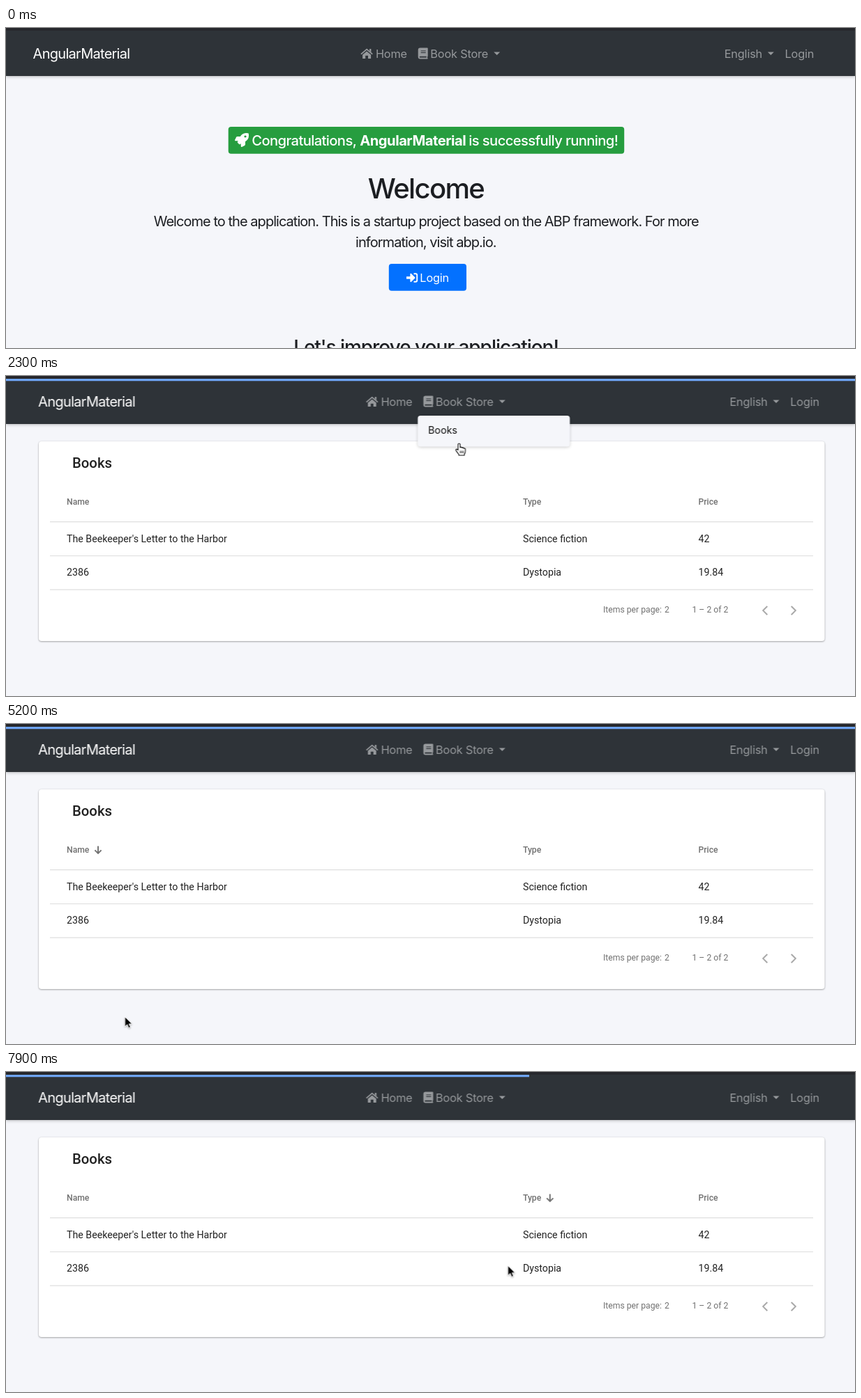
An HTML page that plays this animation: 1217x460 px, repeating every 8 s.

```html
<!DOCTYPE html>
<html lang="en">
<head>
<meta charset="utf-8">
<title>AngularMaterial</title>
<style>
html, body { margin: 0; width: 100%; height: 100%; overflow: hidden; background: #f5f6fa; }
svg { display: block; width: 1217px; height: 460px; }
text { font-family: Inter, sans-serif; font-optical-sizing: none; fill: #1c1e22; white-space: pre; }
.mid { text-anchor: middle; }

/* navigation */
.link { font-size: 16.3px; letter-spacing: -.01em; text-anchor: middle; fill: inherit; }
.muted { fill: #96999c; }
.brand { font-size: 20px; letter-spacing: -.036em; fill: #fff; }
.item { font-size: 14.2px; fill: #111; }
.drop { filter: drop-shadow(0 1px 2px rgba(0,0,0,.2)); }

/* welcome page */
.badge text { font-size: 20.2px; font-weight: 500; letter-spacing: -.03em; text-anchor: middle; fill: #fff; }
.badge .strong { font-weight: 700; letter-spacing: -.024em; }
.h1 { font-size: 40px; font-weight: 500; letter-spacing: -.041em; }
.h3 { font-size: 28px; font-weight: 500; letter-spacing: -.037em; }
.lead { font-size: 20px; letter-spacing: -.048em; }

/* books page */
.books text { font: 400 14.2px Roboto, sans-serif; fill: rgba(0,0,0,.87); }
.books .title { font-size: 20.3px; font-weight: 500; }
.books .head { font-size: 12.2px; font-weight: 500; fill: rgba(0,0,0,.56); }
.books .page { font-size: 12.2px; fill: rgba(0,0,0,.56); }
.card { filter: drop-shadow(0 1px 1px rgba(0,0,0,.3)) drop-shadow(0 0 1px rgba(0,0,0,.1)); }
.rule { stroke: rgba(0,0,0,.13); stroke-width: 1.2; }
.sort { fill: none; stroke: #717171; stroke-width: 1.9; }
.chev { fill: none; stroke: #a9a9a9; stroke-width: 2; }

/* timeline: 1.25% is one 100 ms step */
.a { animation: 8s step-end -8ms infinite; }
.nav { animation-name: nav; }
.home { animation-name: home; }
.books { animation-name: books; }
.menu { animation-name: menu; }
.hover { animation-name: hover; }
.store { animation-name: store; }
.bar { animation-name: bar; }
.row { animation-name: swap; }
.name-up { animation-name: name-up; }
.name-down { animation-name: name-down; }
.type-up { animation-name: type-up; }
.type-down { animation-name: type-down; }
.cursor { animation-name: move; }
.arrow { animation-name: arrow; }
.hand { animation-name: hand; }
.ring { animation-name: ring; }

@keyframes nav { 0% { transform: translateX(-7.6px); } 23.75%, to { transform: none; } }
@keyframes home { 0% { opacity: 1; } 23.75%, to { opacity: 0; } }
@keyframes books { 0% { opacity: 0; } 23.75%, to { opacity: 1; } }
@keyframes menu { 0%, 31.25%, to { opacity: 0; } 13.75% { opacity: 1; } }
@keyframes hover { 0%, to { fill: #fff; } 20% { fill: #f5f6fa; } }
@keyframes store { 0%, 20%, to { fill: #96999c; } 13.75% { fill: #c8cacb; } }
@keyframes bar {
  0%, 31.25%, 56.25%, 68.75%, 90%, to { transform: scaleX(0); opacity: 0; }
  23.75%, 50%, 62.5%, 83.75%, 98.75% { transform: scaleX(.6163); opacity: 1; }
  25%, 51.25%, 63.75%, 85% { transform: scaleX(.85); opacity: 1; }
  26.25%, 52.5%, 65%, 86.25% { transform: none; opacity: 1; }
  30%, 55%, 67.5%, 88.75% { transform: none; opacity: .8; }
}
@keyframes swap {
  0%, 61.25%, 97.5%, to { transform: none; }
  48.75%, 82.5% { transform: translateY(var(--shift)); }
}
@keyframes name-up { 0%, 56.25%, to { opacity: 0; } 42.5% { opacity: 1; } }
@keyframes name-down { 0%, 78.75%, to { opacity: 0; } 56.25% { opacity: 1; } }
@keyframes type-up { 0%, 92.5%, to { opacity: 0; } 78.75% { opacity: 1; } }
@keyframes type-down { 0% { opacity: 0; } 92.5%, to { opacity: 1; } }
@keyframes arrow {
  0%, 13.75%, 40%, 75% { opacity: 0; }
  1.25%, 30%, 60%, 95%, to { opacity: 1; }
}
@keyframes hand {
  0%, 30%, 60%, 95%, to { opacity: 0; }
  13.75%, 40%, 75% { opacity: 1; }
}
@keyframes ring {
  0%, 23.75%, 45%, 57.5%, 80%, 93.75%, to { opacity: 0; }
  21.25%, 42.5%, 55%, 77.5%, 91.25% { opacity: 1; }
}
@keyframes move {
  0% { transform: translate(579px, 142px); }
  1.25% { transform: translate(579px, 142px); animation-timing-function: steps(3); }
  5% { transform: translate(750px, 346px); }
  6.25% { transform: translate(750px, 346px); animation-timing-function: steps(2); }
  8.75% { transform: translate(852px, 215px); animation-timing-function: steps(2); }
  11.25% { transform: translate(700px, 5px); }
  12.5% { transform: translate(527px, 20px); }
  13.75% { transform: translate(600px, 32px); }
  15% { transform: translate(650.5px, 35px); }
  17.5% { transform: translate(650.5px, 35px); animation-timing-function: steps(3); }
  21.25% { transform: translate(649.5px, 97px); }
  28.75% { transform: translate(649.5px, 97px); animation-timing-function: steps(2); }
  31.25% { transform: translate(470px, 365px); animation-timing-function: steps(2); }
  33.75% { transform: translate(294px, 190px); }
  35% { transform: translate(294px, 190px); animation-timing-function: steps(5); }
  41.25% { transform: translate(109px, 179px); }
  58.75% { transform: translate(109px, 179px); animation-timing-function: steps(4); }
  63.75% { transform: translate(172px, 425px); }
  65% { transform: translate(170.5px, 421px); }
  68.75% { transform: translate(170.5px, 421px); animation-timing-function: steps(3); }
  72.5% { transform: translate(470px, 300px); animation-timing-function: steps(3); }
  76.25% { transform: translate(761px, 173px); }
  80% { transform: translate(759px, 173px); }
  93.75% { transform: translate(759px, 173px); animation-timing-function: steps(4); }
  98.75%, to { transform: translate(719.5px, 278.5px); }
}
</style>
</head>
<body>
<svg viewBox="0 0 1217 460">
  <defs>
    <path id="up" d="M0 5.5V-4.6M-4.6-.4 0-5 4.6-.4"/>
    <path id="caret" d="M0 0H9L4.5 4.6Z"/>
  </defs>
  <rect width="1217" height="460" fill="#f5f6fa"/>

  <g class="a home">
    <g class="badge">
      <rect x="318.7" y="142" width="567.5" height="38.8" rx="4" fill="#269d3f"/>
      <path transform="translate(328 151)" fill="#fff" fill-rule="evenodd" d="M19.7.75Q19.5.3 19.2.27 18 0 16 0C12 0 9.6 2.2 7.8 5H3.7Q2.5 5 2 6L.1 9.9Q-.2 11.2.9 11.25H5L4.1 12.1Q3.4 13 4.1 13.9L6.1 15.9Q7 16.6 7.9 15.9L8.75 15V19.1Q8.8 20.2 10.1 19.9L14 18Q15 17.4 15 16.3V12.2C17.8 10.4 20 8 20 4Q20 2.2 19.7.75ZM15 3.4a1.6 1.6 0 1 0 .01 0Z"/>
      <text x="427.2" y="168.5">Congratulations,</text>
      <text class="strong" x="583.2" y="168.5">AngularMaterial</text>
      <text x="770.3" y="168.5">is successfully running!</text>
    </g>
    <text class="h1 mid" x="602" y="245.3">Welcome</text>
    <text class="lead mid" x="602.2" y="284.5">Welcome to the application. This is a startup project based on the ABP framework. For more</text>
    <text class="lead mid" x="601.8" y="315">information, visit abp.io.</text>
    <rect x="548.8" y="339" width="111.2" height="38.8" rx="4" fill="#0371ff"/>
    <g transform="translate(574 352)" fill="#fff">
      <path d="M0 5.2H5.4V1.2L6.6.7 12.4 6.5V7.5L6.6 13.3 5.4 12.8V8.8H0Z"/>
      <path d="M10.5 1.2H13.2Q15.2 1.2 15.2 3.2V10.8Q15.2 12.8 13.2 12.8H10.5" fill="none" stroke="#fff" stroke-width="1.9"/>
    </g>
    <g fill="#fff"><text class="link" x="614.2" y="364.8">Login</text></g>
    <text class="h3 mid" x="602" y="469">Let's improve your application!</text>
  </g>

  <g class="a books">
    <rect class="card" x="47" y="94" width="1126.5" height="287" rx="4" fill="#fff"/>
    <text class="title" x="95" y="132">Books</text>
    <text class="head" x="87" y="185">Name</text>
    <text class="head" x="741" y="185">Type</text>
    <text class="head" x="992.5" y="185">Price</text>
    <g class="sort">
      <g class="a name-up"><use href="#up" x="132" y="180.5"/></g>
      <g class="a name-down"><use href="#up" transform="translate(132 181) scale(1 -1)"/></g>
      <g class="a type-up"><use href="#up" x="779.7" y="180.5"/></g>
      <g class="a type-down"><use href="#up" transform="translate(779.7 181) scale(1 -1)"/></g>
    </g>
    <path class="rule" d="M63 209.7H1157M63 258.5H1157M63 307.2H1157"/>
    <g class="a row" style="--shift: 48.8px">
      <text x="87" y="238.6">The Beekeeper's Letter to the Harbor</text>
      <text x="741" y="238.6">Science fiction</text>
      <text x="992.5" y="238.6">42</text>
    </g>
    <g class="a row" style="--shift: -48.8px">
      <text x="87" y="287.4">2386</text>
      <text x="741" y="287.4">Dystopia</text>
      <text x="992.5" y="287.4">19.84</text>
    </g>
    <text class="page" x="856" y="340.4">Items per page:</text>
    <text class="page" x="944" y="340.4">2</text>
    <text class="page" x="983.5" y="340.4">1 – 2 of 2</text>
    <path class="chev" d="M1091.3 331 1085.2 337.1 1091.3 343.2M1125.7 331 1131.8 337.1 1125.7 343.2"/>
  </g>

  <rect width="1217" height="69" fill="#2e3338" style="filter: drop-shadow(0 1px 2px rgba(0,0,0,.25))"/>
  <rect width="1217" height="3.6" fill="#26272c"/>
  <rect class="a bar" y="4" width="1217" height="3.2" fill="#6fa5f7"/>

  <g class="a nav">
    <text class="brand" x="46.2" y="43.6">AngularMaterial</text>
    <g class="muted">
      <g transform="translate(515.7 29)">
        <path d="M.8 8.6 9 1.6 17.2 8.6" fill="none" stroke="#96999c" stroke-width="1.7"/>
        <path d="M3 9.4 9 4.4 15 9.4V15H10.9V10.7H7.1V15H3ZM13 1H15.3V6L13 4Z"/>
      </g>
      <text class="link" x="560" y="42.9">Home</text>
      <text class="link" x="1064.5" y="42.9">English</text>
      <use href="#caret" x="1099.4" y="34.4"/>
      <text class="link" x="1145" y="42.9">Login</text>
    </g>
    <g class="a store">
      <path transform="translate(598.3 28.6)" fill-rule="evenodd" d="M3 0H13.2Q14 0 14 .8V11.6Q14 12.2 13.5 12.4 13.2 13.8 13.5 14.4 14 14.7 14 15.2 14 16 13.2 16H3Q0 16 0 13V3Q0 0 3 0ZM4 4H11V5H4ZM4 6.3H11V7.3H4ZM3 12.2H12V14H3Q2 14 2 13.1T3 12.2Z"/>
      <text class="link" x="657.3" y="42.9">Book Store</text>
      <use href="#caret" x="706.8" y="34.4"/>
    </g>
    <g class="a menu">
      <g class="drop"><rect class="a hover" x="590.2" y="57" width="218" height="44.5" rx="4"/></g>
      <text class="item" x="605.2" y="83.2">Books</text>
    </g>
  </g>

  <g class="a cursor">
    <circle class="a ring" r="31" fill="none" stroke="#111" stroke-width="1.5"/>
    <g class="a arrow">
      <path style="filter: drop-shadow(0 1px 1px rgba(0,0,0,.3))" d="M0 0V14L3.3 11 5.5 16 7.9 15 5.8 10.1H10.2Z" stroke="#fff" stroke-width=".9"/>
    </g>
    <g class="a hand">
      <path d="M-1.5 1.2Q-1.4 0 0 0T1.5 1.2V6Q1.7 5 3 5.2T4.2 6.5Q4.6 5.6 5.7 5.9T6.8 7.2Q7.3 6.6 8.2 7T9 8.5V11Q9 14 7.6 15V17H-.4V15.6Q-2 14-4.3 10.4-5.2 9-4.4 8.3T-1.5 9.4Z" fill="#fff" stroke="#111" stroke-width="1.1" stroke-linejoin="round"/>
      <path d="M1.8 10.5V14M3.9 10.5V14M6 10.5V14" stroke="#111" stroke-width=".9"/>
    </g>
  </g>
</svg>
</body>
</html>
```
